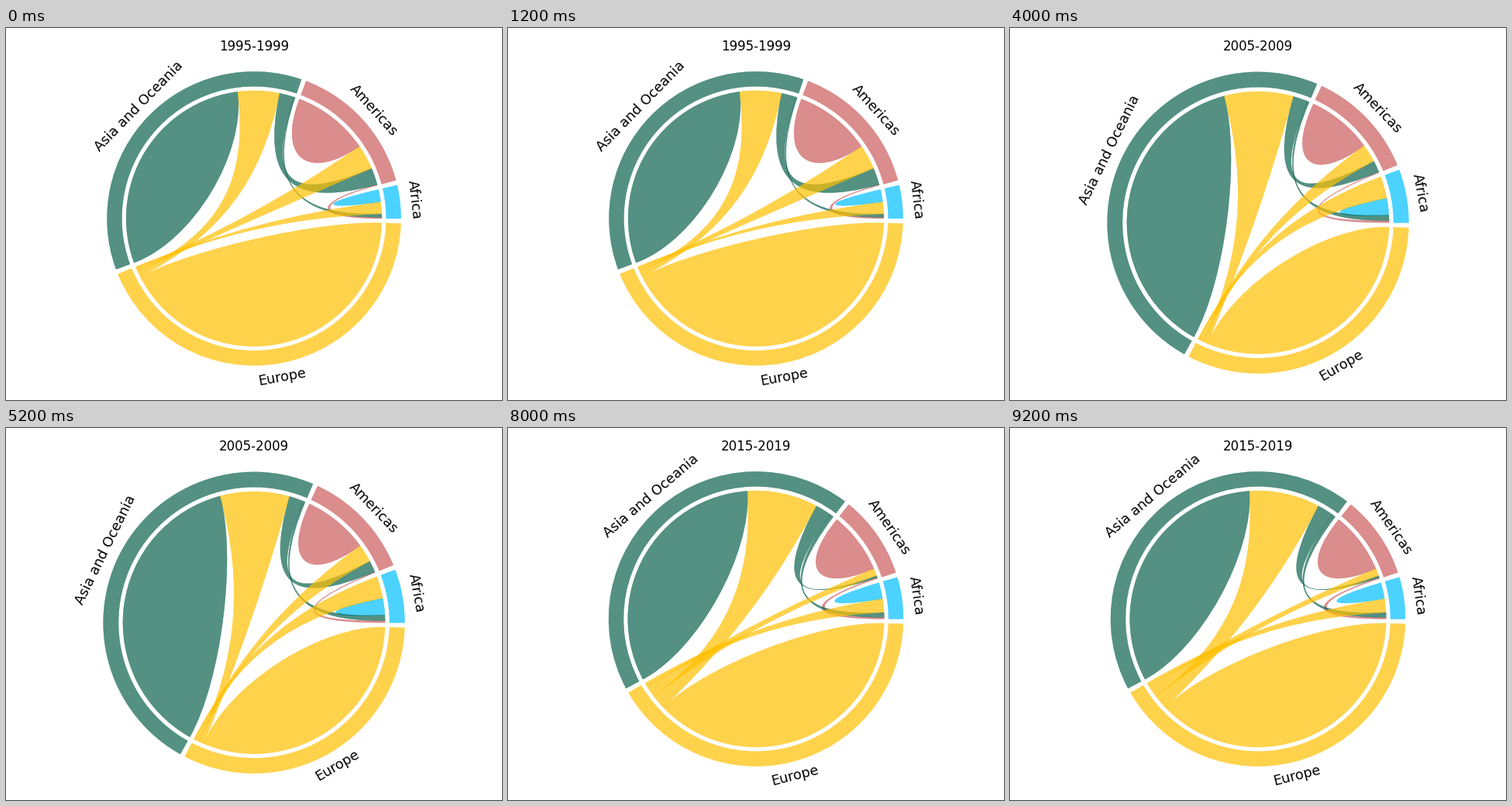
Recreate the animation shown at these times as a matplotlib script. Size 640 px wide and 480 px high, loop 10000 ms.

```python
import numpy as np
import matplotlib.pyplot as plt
from matplotlib.animation import FuncAnimation
from matplotlib.patches import PathPatch
from matplotlib.path import Path

plt.rcParams["font.family"] = "DejaVu Sans"

NAMES = ["Africa", "Americas", "Asia and Oceania", "Europe"]
COLORS = ["#00bfff", "#cd5c5c", "#0b634e", "#ffc000"]
ALPHA, LW = 0.7, 0.3
PAD, WIDTH, GAP, CHORD = 2, 0.1, 0.03, 0.7
RADIUS = 1 - WIDTH - GAP
PERIODS = 5

# arc of each region per period, in degrees; Europe takes the rest
AFRICA = [13.1, 14.6, 20.5, 18.0, 16.4]
AMERICAS = [54.1, 44.4, 42.5, 22.6, 32.5]
ASIA = [129.0, 174.3, 173.7, 155.6, 155.2]


def shares(k):
    """Share of each region's flow that goes to each region in period k."""
    def ease(start, end, mid=2.6):
        return start + (end - start) / (1 + np.exp(-2.5 * (k - mid)))

    def bend(base, curve, mid):
        return base + curve * (k - mid) ** 2

    m = np.array([
        [0, 0.044, ease(0.117, 0.135), bend(0.475, -0.0216, 1.8)],
        [ease(0.006, 0.014), 0, ease(0.143, 0.025), ease(0.207, 0.097)],
        [ease(0.004, 0.011), bend(0.037, 0.0032, 2.2), 0, ease(0.146, 0.206, 2)],
        [ease(0.0045, 0.012), ease(0.0095, 0.037, 2.5), ease(0.017, 0.046, 3.1), 0],
    ])
    return m + np.diag(1 - m.sum(axis=1))


def layout(k):
    """Angles of each region and of each flow, smallest flow first."""
    sizes = [AFRICA[k], AMERICAS[k], ASIA[k]]
    sizes.append(360 - PAD * len(NAMES) - sum(sizes))
    arcs, spans, start = [], {}, 0
    for i, row in enumerate(shares(k) * np.array(sizes)[:, None]):
        a = start
        for j in np.argsort(row):
            spans[i, j] = (a, a + row[j])
            a += row[j]
        arcs.append((start, a))
        start = a + PAD
    return arcs, spans


def polar(r, deg):
    a = np.radians(deg)
    return np.array([r * np.cos(a), r * np.sin(a)])


def arc(r, start, end, parts=4):
    """Cubic Bezier points along a circle, first point included."""
    angles = np.linspace(start, end, parts + 1)
    k = 4 / 3 * np.tan(np.radians(end - start) / (4 * parts)) * r
    pts = [polar(r, start)]
    for a, b in zip(angles[:-1], angles[1:]):
        pts += [polar(r, a) + polar(k, a + 90),
                polar(r, b) + polar(k, b - 90), polar(r, b)]
    return pts


def add_shape(ax, pts, color, line_at=()):
    codes = [Path.MOVETO] + [Path.CURVE4] * (len(pts) - 1)
    for i in line_at:
        codes[i] = Path.LINETO
    ax.add_patch(PathPatch(Path(pts, codes), facecolor=color, edgecolor=color,
                           alpha=ALPHA, lw=LW))


def ring(ax, start, end, color):
    outer = arc(1, start, end)
    inner = arc(1 - WIDTH, end, start)
    n = len(outer)
    add_shape(ax, outer + inner + [outer[0]], color, (n, 2 * n))


def self_chord(ax, span, color):
    rc = RADIUS * (1 - 0.7 * CHORD)
    start, end = span
    pts = arc(RADIUS, start, end)
    add_shape(ax, pts + [polar(rc, end), polar(rc, start), pts[0]], color)


def chord(ax, one, two, color):
    def depth(a, b):
        gap = min((a - b) % 360, (b - a) % 360)
        bow = np.clip(0.4 + (gap - 2 * PAD) / (15 * PAD), 0.2, 1)
        return RADIUS * (1 - CHORD * bow)

    (s1, e1), (s2, e2) = one, two
    near, far = depth(e1, s2), depth(s1, e2)
    first = arc(RADIUS, s1, e1)
    pts = first + [polar(near, e1), polar(near, s2)] + arc(RADIUS, s2, e2)
    pts += [polar(far, e2), polar(far, s1), first[0]]
    add_shape(ax, pts, color)


def label(ax, name, angle):
    upper = angle <= 210
    x, y = polar(1.05, angle)
    ax.text(x, y, name, fontsize=12.8, ha="center",
            va="bottom" if upper else "top", rotation_mode="anchor",
            rotation=angle - (90 if upper else 270))


fig, ax = plt.subplots(figsize=(6.4, 4.8), dpi=100, facecolor="white")


def draw(k):
    ax.clear()
    ax.set(xlim=(-1.1, 1.1), ylim=(-1.1, 1.1), aspect=1)
    ax.axis("off")
    arcs, spans = layout(k)
    for i, (start, end) in enumerate(arcs):
        ring(ax, start, end, COLORS[i])
        self_chord(ax, spans[i, i], COLORS[i])
        for j in range(i):
            chord(ax, spans[i, j], spans[j, i], COLORS[i])
    for name, ends in zip(NAMES, arcs):
        label(ax, name, sum(ends) / 2)
    year = 1995 + 5 * k
    ax.set_title(f"{year}-{year + 4}", fontsize=12)
    # same start each time; the second pass lets the labels settle
    fig.subplots_adjust(left=0.125, right=0.9, bottom=0.11, top=0.88)
    for _ in range(2):
        fig.tight_layout()
    return []


anim = FuncAnimation(fig, draw, frames=PERIODS, init_func=lambda: [],
                     interval=2000, repeat=True, repeat_delay=0)
plt.show()
```
